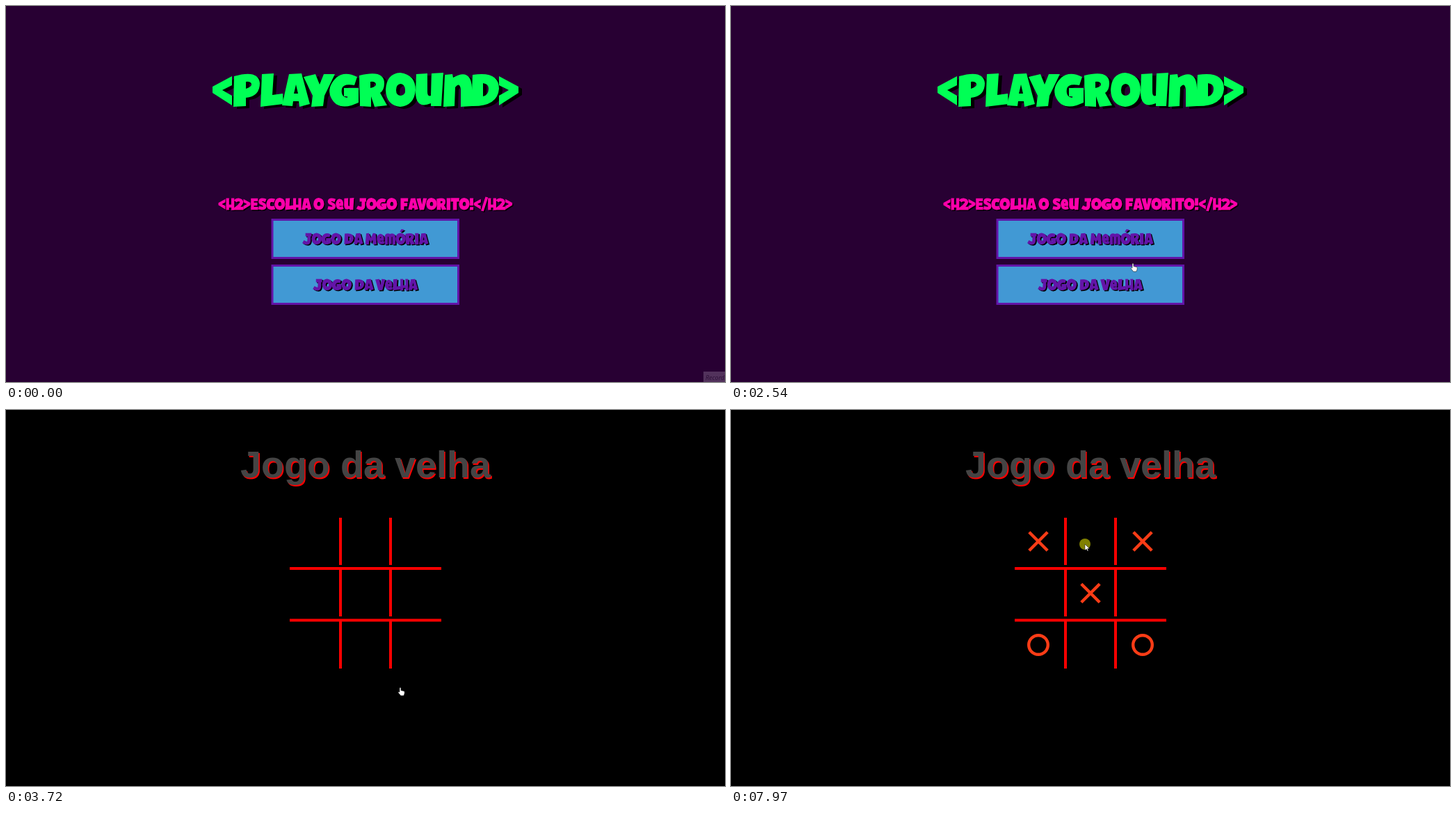
Animation of 1034 by 541 pixels, one loop 8 s. Source, as an HTML page:

```html
<!DOCTYPE html>
<html lang="pt-BR">
<head>
<meta charset="utf-8">
<title>Playground</title>
<style>
html, body { margin: 0; width: 100%; height: 100%; overflow: hidden; background: #000; }
svg { display: block; width: 100%; height: 100%; }
.board-title { font: bold 54px "Liberation Sans", Arial, sans-serif; text-anchor: middle; }
.badge { font: italic 9px "Open Sans", sans-serif; }
</style>
</head>
<body>
<svg id="stage" viewBox="0 0 1034 541"></svg>
<script>
const LOOP = 8000;
const BLUE = [65, 153, 212], PURPLE = [99, 20, 168], PINK = [255, 0, 176];

// Chunky display letters, 48 units tall: [advance, path, stroke width]; no width means filled.
const O = 'M20-1Q42 2 42 24 40 46 20 48 0 46-1 24 0 0 20-1zM20 15q-6 1-6 9 0 8 7 8 7-1 6-9-1-8-7-8z';
const GLYPHS = {
  ' ': [14, ''],
  '<': [30, 'M28 4 0 19v9l28 18V32L14 24l14-7z'],
  '>': [29, 'M0 4 28 19v9L0 46V32l14-8L0 17z'],
  '/': [26, 'M4 52 22-4', 11],
  '!': [18, 'M9 0V30M9 36V48', 14],
  '2': [36, 'M3 13Q8 6 18 7 30 9 28 18 24 28 6 41H36', 13],
  A: [35, 'M10 1 28 0 40 44 25 48 24 40H16L15 47 0 46zM17 29H23L20 16z'],
  C: [34, 'M33 11Q10 2 8 22 6 46 34 38', 15],
  D: [40, 'M2 2Q40-4 40 22 38 48 0 47zM17 14v19q8-2 8-11 0-7-8-8z'],
  E: [30, 'M29 7H7V41H30M7 24H27', 12],
  e: [33, 'M9 26H25Q26 9 16 9 7 12 7 26 8 46 31 38', 12],
  F: [32, 'M8 48V7H31M8 26H28', 14],
  G: [41, 'M38 5Q20-4 8 6-6 20 0 34 8 52 30 46l10-4V21H19v12h5v2Q14 34 16 22 18 14 34 17z'],
  H: [35, 'M7 0V48M28 0V48M7 32H28', 12],
  I: [18, 'M9 0V48', 15],
  J: [37, 'M0 36Q24 50 25 30V0M10 7H36', 14],
  L: [32, 'M3 1 20 0 18 31 33 29 34 44 1 48z'],
  M: [48, 'M4 1 15 0 24 20 33 0 44 1 48 47 33 48 31 28 24 42 17 28 15 48 0 47z'],
  m: [48, 'M8 48V16Q8 8 16 8 24 8 24 20V46M24 20Q24 8 32 8 40 8 40 20V48', 13],
  n: [41, 'M3 2 14 1 15 6Q40-8 42 20V47L26 48V22q-2-10-8-2L17 47 1 48z'],
  O: [41, O],
  'Ó': [41, O + 'M17-6 24-17 36-15 25-5z'],
  P: [38, 'M1 4Q36-6 38 14 38 33 18 35V47L0 48zM18 12v10q9-3 8-7-2-4-8-3z'],
  R: [39, 'M0 3Q36-6 36 14 36 24 30 28L40 46 22 48 17 33V48L1 47zM16 12v9q9-2 8-6-2-4-8-3z'],
  S: [33, 'M31 10Q10 2 8 13 8 20 18 23 30 28 26 37 20 44 2 39', 13],
  T: [34, 'M0 7H34M17 7V48', 15],
  u: [40, 'M2 1 18 0V26q0 8 5 6l1-32 17-1-3 48H23V43Q2 52 1 28z'],
  V: [38, 'M-2 2 15 0 20 26 25 0 40 1 28 47 11 48z'],
  Y: [35, 'M-4 5 13 1 19 16 25 1 41 1 26 32 24 47 7 48 9 32z']
};

// Pointer path: time, x, y
const PATH = [
  [260, 954, 432], [480, 850, 300], [680, 740, 226], [860, 650, 245], [1010, 606, 278],
  [1080, 600, 282], [1490, 583, 303], [1780, 562, 325], [1920, 572, 362], [2200, 585, 366],
  [2540, 578, 370], [2690, 576, 382], [3000, 570, 395], [3320, 567, 399], [3990, 567, 399],
  [4400, 515, 300], [4700, 462, 212], [4800, 457, 203], [4870, 457, 203], [5080, 466, 285],
  [5220, 461, 317], [5490, 461, 317], [5630, 531, 229], [5780, 582, 197], [5860, 582, 197],
  [6160, 571, 270], [6440, 590, 325], [6510, 590, 325], [6800, 560, 290], [7000, 538, 268],
  [7140, 538, 268], [7400, 512, 190], [7550, 508, 159], [7700, 508, 159], [7900, 509, 193]
];
const CLICKS = [3580, 4800, 5420, 5790, 6440, 7070, 7970];
const MOVES = [[4870, 'x', 442, 189], [5490, 'o', 442, 338], [5860, 'x', 592, 189],
  [6510, 'o', 592, 338], [7140, 'x', 517, 263.5]];

const stage = document.getElementById('stage');

function set(node, attrs) {
  for (const key in attrs) node.setAttribute(key, attrs[key]);
  return node;
}

function add(parent, tag, attrs, text) {
  const node = set(document.createElementNS('http://www.w3.org/2000/svg', tag), attrs);
  if (text) node.textContent = text;
  return parent.appendChild(node);
}

function show(node, on) {
  node.setAttribute('visibility', on ? 'visible' : 'hidden');
}

function drawLetters(parent, text, attrs) {
  const group = add(parent, 'g', attrs);
  let x = 0;
  for (const ch of text) {
    const [advance, d, width] = GLYPHS[ch];
    const paint = width
      ? { fill: 'none', stroke: 'currentColor', 'stroke-width': width }
      : { fill: 'currentColor', 'fill-rule': 'evenodd' };
    add(group, 'path', { d, transform: `translate(${x} 0)`, ...paint });
    x += advance;
  }
  return { group, width: x };
}

function lettering(parent, text, label, color, dx, dy) {
  const group = add(parent, 'g', { role: 'img', 'aria-label': label });
  drawLetters(group, text, { color: '#000', transform: `translate(${dx} ${dy})` });
  const face = drawLetters(group, text, { color });
  return {
    face: face.group,
    place(x, y, scale) {
      set(group, { transform: `translate(${x} ${y}) scale(${scale}) translate(${-face.width / 2} -24)` });
    }
  };
}

function button(text, label) {
  const box = add(menu, 'rect', { x: 383, width: 267.5, 'stroke-width': 3 });
  const word = lettering(menu, text, label, '#000', 5, 4);
  return (top, p) => {
    const height = 58 + 1.2 * p;
    const edge = mix(PURPLE, BLUE, p);
    set(box, { y: top + 1.5, height: height - 3, fill: mix(BLUE, PINK, p), stroke: edge });
    set(word.face, { color: edge });
    word.place(516.5, top + height / 2, 0.34 * (1 + 0.05 * p));
  };
}

function mix(a, b, p) {
  return `rgb(${a.map((v, i) => Math.round(v + (b[i] - v) * p)).join()})`;
}

// The CSS "ease" curve, cubic-bezier(.25, .1, .25, 1)
function ease(x) {
  if (x <= 0) return 0;
  if (x >= 1) return 1;
  const bezier = (s, a, b) => 3 * s * (1 - s) ** 2 * a + 3 * s * s * (1 - s) * b + s ** 3;
  let lo = 0, hi = 1;
  for (let i = 0; i < 24; i++) {
    const mid = (lo + hi) / 2;
    if (bezier(mid, 0.25, 0.25) < x) lo = mid; else hi = mid;
  }
  return bezier(lo, 0.1, 1);
}

// Hover progress; leaving early shortens the way back.
function hover(t, enter, leave) {
  if (t < leave) return ease((t - enter) / 800);
  const peak = ease((leave - enter) / 800);
  return peak * (1 - ease((t - leave) / (800 * peak)));
}

function pointerAt(t) {
  const next = PATH.findIndex(key => key[0] > t);
  if (next < 0) return PATH[PATH.length - 1].slice(1);
  if (next === 0) return PATH[0].slice(1);
  const [t0, x0, y0] = PATH[next - 1], [t1, x1, y1] = PATH[next];
  const p = (t - t0) / (t1 - t0);
  return [x0 + (x1 - x0) * p, y0 + (y1 - y0) * p];
}

// Menu page
const menu = add(stage, 'g', {});
add(menu, 'rect', { width: 1034, height: 541, fill: '#280033' });
lettering(menu, '<PLAYGROunD>', '<Playground>', '#00ff55', 5, 3).place(517.5, 121, 1);
const heading = lettering(menu, '<H2>ESCOLHA O Seu JOGO FAVORITO!</H2>',
  '<h2>Escolha o seu jogo favorito!</h2>', '#ff00aa', 4, 4);
const memory = button('JOGO DA MemÓRIA', 'Jogo da Memória');
const oldLady = button('JOGO DA VeLHA', 'Jogo da Velha');
const badge = add(menu, 'g', {});
add(badge, 'rect', { x: 1003, y: 526, width: 31, height: 15, fill: '#52325c' });
add(badge, 'text', { x: 1006, y: 538, class: 'badge', fill: '#2c0f37' }, 'Recording');

// Board page
const board = add(stage, 'g', {});
add(board, 'rect', { width: 1034, height: 541, fill: '#000' });
add(board, 'text', { x: 518.5, y: 98.5, class: 'board-title', fill: '#f00', 'aria-hidden': true }, 'Jogo da velha');
add(board, 'text', { x: 517, y: 97, class: 'board-title', fill: '#444' }, 'Jogo da velha');
const rows = 'V223m0 6V297m0 6.5V372';
add(board, 'path', {
  d: `M481 155${rows}M553 155${rows}M408 228H626M408 302.5H626`,
  stroke: '#f00', 'stroke-width': 4
});
const marks = MOVES.map(([time, kind, x, y]) => {
  const d = kind === 'x'
    ? 'M-13.2-13.2 13.2 13.2M-13.2 13.2 13.2-13.2'
    : 'M-13.8 0a13.8 13.8 0 1 1 27.6 0a13.8 13.8 0 1 1-27.6 0z';
  const node = add(board, 'path', {
    d, transform: `translate(${x} ${y})`, fill: 'none', stroke: '#fb3c16', 'stroke-width': 4.4
  });
  return { time, node };
});

// Pointer
const pointer = add(stage, 'g', {});
const ring = add(pointer, 'circle', { r: 8, fill: '#ff0', 'fill-opacity': 0.5 });
const skin = { fill: '#fff', stroke: '#222', 'stroke-width': 0.6 };
const arrow = add(pointer, 'path', { d: 'M0 0V9L2.2 7 3.6 10 5 9.4 3.6 6.4H6.4z', ...skin });
const hand = add(pointer, 'path', {
  d: 'M-1 1Q0-.5 1 1V4.5L5.5 5.5Q6.5 6 6.1 9L5 12H.7L-3 7.5Q-2.5 6-1 7z', ...skin
});

function render(t) {
  const p1 = hover(t, 1490, 1920), p2 = hover(t, 2530, Infinity);
  const lift = -0.6 * (p1 + p2);
  heading.place(517, 285 + lift, 0.357);
  memory(306 + lift, p1);
  oldLady(372 + lift + 1.2 * p1, p2);
  show(badge, t < 70);

  const playing = t >= 3720;
  set(board, { display: playing ? 'inline' : 'none' });
  set(menu, { display: playing ? 'none' : 'inline' });
  marks.forEach(mark => show(mark.node, t >= mark.time));

  const [x, y] = pointerAt(t);
  const pointing = (t >= 1490 && t < 1920) || (t >= 2530 && t < 3780);
  set(pointer, { transform: `translate(${x} ${y})`, display: t < 260 ? 'none' : 'inline' });
  show(hand, pointing);
  show(arrow, !pointing);
  show(ring, CLICKS.some(c => t >= c && t < c + 70));
}

const start = performance.now();
function tick(now) {
  render(Math.max(0, now - start) % LOOP);
  requestAnimationFrame(tick);
}
render(0);
requestAnimationFrame(tick);
</script>
</body>
</html>
```
